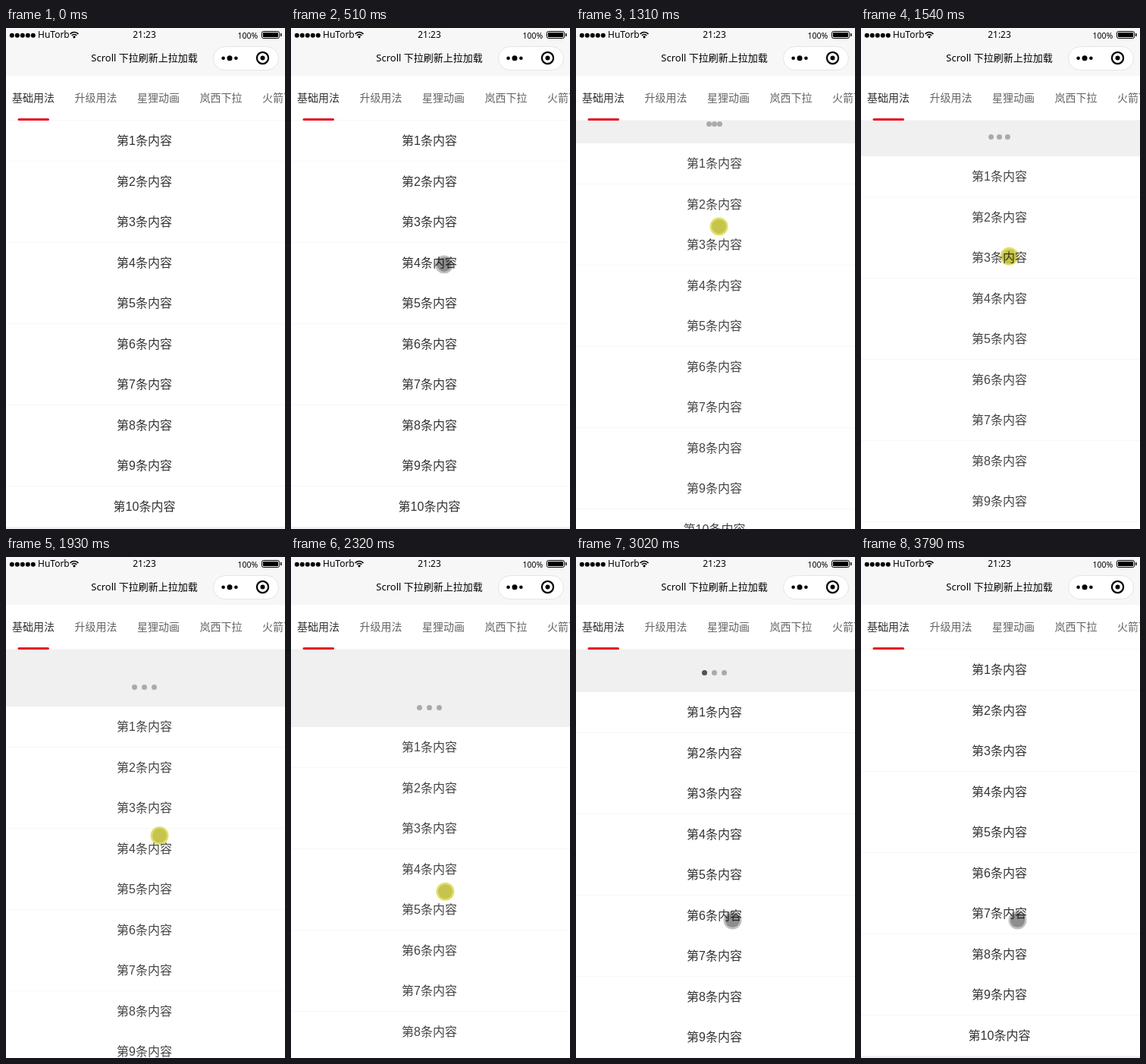
Write an HTML page with a canvas that moves like this. It is 368 by 660 pixels and loops after 4240 ms.

```html
<!DOCTYPE html>
<html lang="zh-CN">
<head>
<meta charset="utf-8">
<title>Scroll</title>
<style>
html, body { margin: 0; width: 100%; height: 100%; overflow: hidden; background: #fff; }
canvas { display: block; width: 368px; height: 660px; }
</style>
</head>
<body>
<canvas id="stage"></canvas>
<script>
const W = 368, H = 660, MID = 182.5;
const LOOP = 4240, STEP = 77.2, LEAD = 22;
const NAV = 63, TOP = 122, ROW = 53.5, ROWS = 10;
const APPEAR = 70, PRESS = 800, RELEASE = 2530, DONE = 3440, BACK = 300;
const REFRESH_H = 56;
const UI = '"Noto Sans", "Noto Sans CJK SC", "Noto Sans CJK", sans-serif';
const BODY = '"Liberation Sans", "Noto Sans CJK SC", "Noto Sans CJK", sans-serif';
const TABS = ['基础用法', '升级用法', '星狸动画', '岚西下拉', '火箭下拉'];

const ENTRY = { x: 282, y: 632 };
// Key points of the drag gesture.
const DRAG = [
  { t: PRESS, x: 174, y: 199 },
  { t: 1080, x: 181.5, y: 222 },
  { t: 1540, x: 195.5, y: 300 },
  { t: 1930, x: 202.5, y: 367 },
  { t: 2320, x: 203.5, y: 441.5 },
  { t: RELEASE, x: 206.5, y: 478.5 }
];
const GRAB = DRAG[0], DROP = DRAG[DRAG.length - 1];

const canvas = document.getElementById('stage');
const ctx = canvas.getContext('2d');
const dpr = window.devicePixelRatio || 1;
canvas.width = W * dpr;
canvas.height = H * dpr;

const ramp = (t, a, b) => Math.max(0, Math.min(1, (t - a) / (b - a)));
const mix = (a, b, p) => a + (b - a) * p;
const mixPoint = (a, b, p) => ({ x: mix(a.x, b.x, p), y: mix(a.y, b.y, p) });
const smooth = p => p * p * (3 - 2 * p);
const isPressed = t => t >= PRESS && t < RELEASE;

// Standard CSS "ease" curve.
function ease(p) {
  const bez = (a, b, u) => 3 * a * u * (1 - u) ** 2 + 3 * b * u * u * (1 - u) + u ** 3;
  let lo = 0, hi = 1;
  for (let i = 0; i < 20; i++) {
    const u = (lo + hi) / 2;
    if (bez(0.25, 0.25, u) < p) lo = u; else hi = u;
  }
  return bez(0.1, 1, lo);
}

function pointerAt(t) {
  if (t < PRESS) return mixPoint(ENTRY, GRAB, smooth(ramp(t, APPEAR, 660)));
  const i = DRAG.findIndex(k => k.t > t);
  if (i < 0) return DROP;
  return mixPoint(DRAG[i - 1], DRAG[i], ramp(t, DRAG[i - 1].t, DRAG[i].t));
}

// The list follows the finger with growing resistance.
function pullFor(y) {
  const d = y - GRAB.y;
  return 0.4968 * d - 0.000311 * d * d;
}

function offsetAt(t) {
  if (t < PRESS) return 0;
  if (t < RELEASE) return pullFor(pointerAt(t).y);
  if (t < DONE) return mix(pullFor(DROP.y), REFRESH_H, ease(ramp(t, RELEASE, RELEASE + BACK)));
  return REFRESH_H * (1 - ease(ramp(t, DONE, DONE + BACK)));
}

function rect(x, y, w, h, color) {
  ctx.fillStyle = color;
  ctx.fillRect(x, y, w, h);
}

function pill(x, y, w, h, r, fill, stroke) {
  ctx.beginPath();
  ctx.roundRect(x, y, w, h, r);
  if (fill) {
    ctx.fillStyle = fill;
    ctx.fill();
  }
  if (stroke) {
    ctx.strokeStyle = stroke;
    ctx.lineWidth = 1;
    ctx.stroke();
  }
}

function disc(x, y, r, color) {
  ctx.fillStyle = color;
  ctx.beginPath();
  ctx.arc(x, y, r, 0, Math.PI * 2);
  ctx.fill();
}

function arc(x, y, r, width, color, from = 0, to = 2) {
  ctx.strokeStyle = color;
  ctx.lineWidth = width;
  ctx.beginPath();
  ctx.arc(x, y, r, from * Math.PI, to * Math.PI);
  ctx.stroke();
}

function text(str, x, y, size, color, family = UI, align = 'left') {
  ctx.font = `${size}px ${family}`;
  ctx.textAlign = align;
  ctx.fillStyle = color;
  ctx.fillText(str, x, y);
}

function drawLoader(t, off) {
  const gap = 13 * Math.min(1, off / REFRESH_H);
  const next = ramp(t, 3165, 3315);
  const levels = [ramp(t, 2780, 3010) - next, next, 0];
  levels.forEach((level, i) => {
    const g = Math.round(mix(170, 82, level));
    disc(MID + (i - 1) * gap, TOP + off - 25.5, 3.5, `rgb(${g},${g},${g})`);
  });
}

function drawList(t, off) {
  const ink = isPressed(t) ? '#444' : '#333';
  rect(0, TOP, W, H - TOP, '#f0f0f0');
  if (off > 0 && t < DONE) drawLoader(t, off);
  rect(0, TOP + off, W, ROW * ROWS, '#fff');
  for (let i = 0; i < ROWS; i++) {
    text(`第${i + 1}条内容`, MID, Math.round(154 + ROW * i) + off, 16, ink, BODY, 'center');
    if (i % 2 === 0) rect(0, Math.floor(TOP + ROW * (i + 1)) + off, W, 1, '#f7f7f7');
  }
}

function drawStatus() {
  rect(0, 0, W, NAV, '#f7f7f7');
  for (let i = 0; i < 5; i++) disc(7.8 + i * 7, 9.7, 3, '#000');
  text('HuTorb', 42, 13, 12, '#000');
  for (const r of [4, 7]) arc(90, 12.5, r, 1.6, '#000', -0.78, -0.22);
  disc(90, 11.8, 1.6, '#000');
  text('21:23', MID, 13, 12, '#000', UI, 'center');
  text('100%', 305.5, 14, 10.5, '#000');
  pill(337.5, 4.5, 23, 9, 2, null, '#000');
  rect(339, 6, 20, 6, '#000');
  rect(362, 7, 1.5, 4, '#000');
}

function drawNav() {
  text('Scroll 下拉刷新上拉加载', MID, 44, 13, '#000', UI, 'center');
  pill(273.5, 24.5, 86, 31, 15.5, '#fff', '#e5e5e5');
  for (const i of [-1, 0, 1]) disc(295 + i * 8.4, 39.8, i ? 2.3 : 3.5, '#000');
  arc(338.5, 39.5, 7.6, 2.2, '#000');
  disc(338.5, 39.5, 3, '#000');
}

function drawTabs() {
  rect(0, NAV, W, TOP - NAV, '#fff');
  rect(0, TOP - 1, W, 1, '#f7f7f7');
  TABS.forEach((label, i) => text(label, 8 + i * 82.5, 97, 14, i ? '#646566' : '#323233', BODY));
  pill(15.5, 119, 41.5, 3, 1.5, '#e81024');
}

function drawPointer(t) {
  if (t < APPEAR) return;
  const { x, y } = pointerAt(t);
  const [ring, fill] = isPressed(t) ? ['#e0e068', '#c6c44c'] : ['#c0c0c0', '#8e8e8e'];
  ctx.globalCompositeOperation = 'multiply';
  arc(x, y, 10.7, 2.6, ring);
  disc(x, y, 9.5, fill);
  ctx.globalCompositeOperation = 'source-over';
}

function draw(t) {
  ctx.setTransform(dpr, 0, 0, dpr, 0, 0);
  drawList(t, Math.round(offsetAt(t)));
  drawStatus();
  drawNav();
  drawTabs();
  drawPointer(t);
}

const start = performance.now();
function frame() {
  const t = (performance.now() - start) % LOOP;
  // The screen refreshes in even steps, like a recording.
  draw(Math.floor((t + LEAD) / STEP) * STEP);
  requestAnimationFrame(frame);
}
frame();
</script>
</body>
</html>
```
